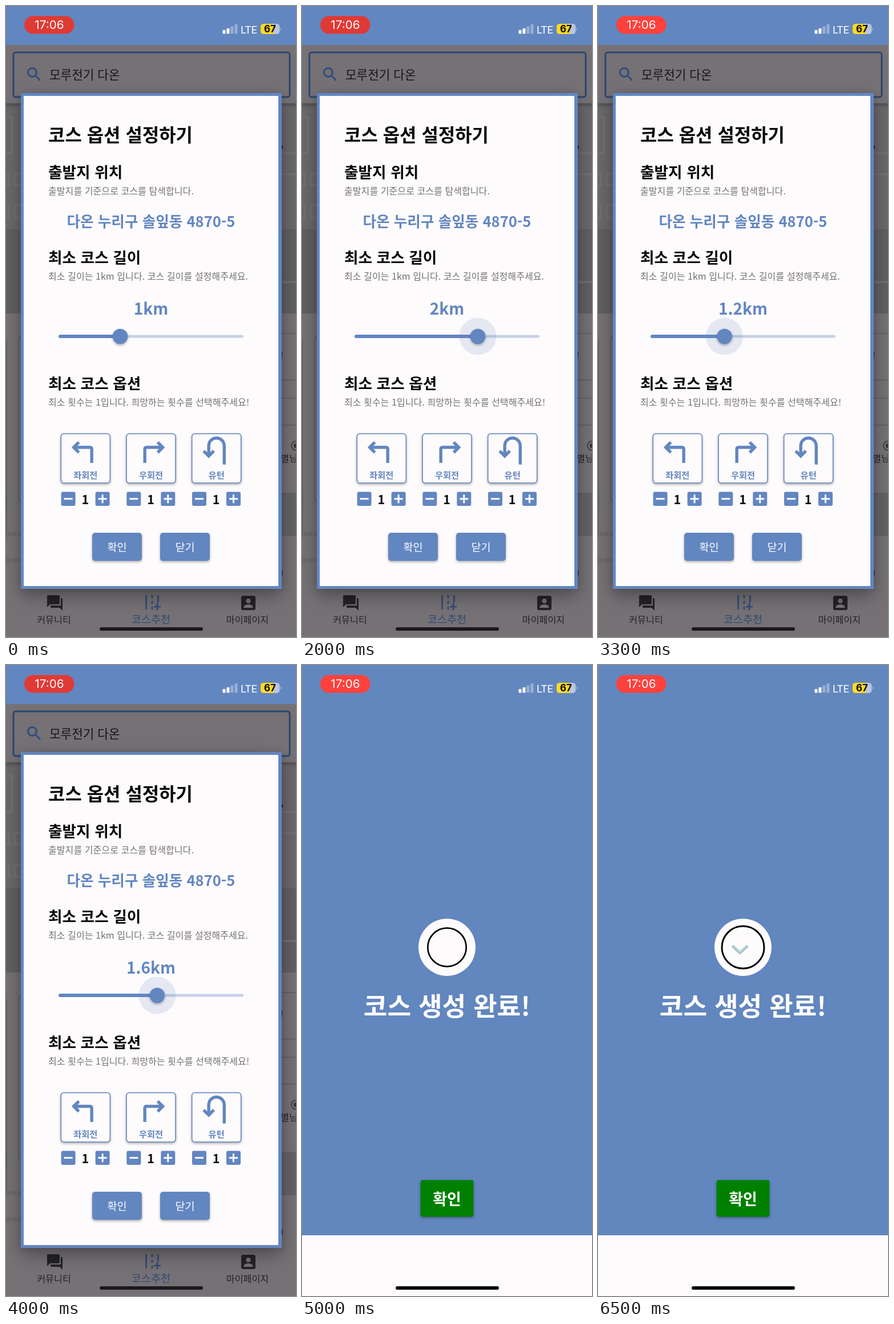
An HTML page that plays this animation: 508x1102 px, repeating every 6.6 s.

```html
<!DOCTYPE html>
<html lang="ko">
<head>
<meta charset="utf-8">
<title>코스 옵션</title>
<style>
html, body { margin: 0; width: 100%; height: 100%; overflow: hidden; background: #6286c0; }
svg { display: block; width: 100vw; height: 100vh; }
text { font-family: "Noto Sans CJK KR", "Noto Sans CJK", "Noto Sans", sans-serif; }
.ui { font-family: Inter, Roboto, sans-serif; }
.b { font-weight: 700; }
.m { font-weight: 500; }
.mid { text-anchor: middle; }
.blue { fill: #6286c0; }
.white { fill: #fff; }
.h2 { font-size: 26.7px; font-weight: 700; fill: #0b0a0b; }
.sub { font-size: 16.1px; fill: #747175; }
.lift { filter: drop-shadow(0 2.5px 2px rgba(0,0,0,.32)); }
.dialog { filter: drop-shadow(0 12px 16px rgba(0,0,0,.3)) drop-shadow(0 2px 6px rgba(0,0,0,.12)); }
</style>
</head>
<body>
<svg viewBox="0 0 508 1102" preserveAspectRatio="none">
  <g id="options">
    <rect width="508" height="1102" fill="#757175"/>
    <!-- dimmed map -->
    <rect y="165" width="508" height="372" fill="#6b686c"/>
    <rect y="390" width="508" height="147" fill="#625f63"/>
    <g fill="none" stroke="#726f73" stroke-width="4">
      <path d="M0 194H11V256H0M0 293H5V313H0M15 293H30V313H15ZM0 348H5V370H0M15 348H30V370H15Z"/>
      <path d="M480 257H508M480 294H508M480 482H508"/>
    </g>
    <rect y="537" width="508" height="460" fill="#757175"/>
    <g fill="none" stroke="#656266" stroke-width="2">
      <path d="M1 584V928M30 576Q22 576 22 586V858Q22 866 30 866M470 572H508M470 653H508M470 685H508M470 732H508"/>
      <path d="M0 922H30M0 968H30" stroke-width="7" stroke-dasharray="2 2"/>
    </g>
    <rect x="470" y="850" width="38" height="76" fill="#656266"/>
    <path d="M0 850V878" stroke="#3d6242" stroke-width="2"/>
    <g fill="#252326">
      <rect x="482" y="244" width="3" height="5"/>
      <path d="M482 603h2v9h-2zM482 614h2v2h-2z"/>
      <text x="481" y="796" font-size="16.3" class="m">별님</text>
      <text x="481" y="996" font-size="15">)</text>
    </g>
    <circle cx="508" cy="768" r="8" fill="none" stroke="#343135" stroke-width="1.5"/>
    <circle cx="508" cy="768" r="4" fill="#343135"/>
    <!-- search field -->
    <rect x="-4" y="60" width="516" height="110" rx="4" fill="#757175" style="filter:drop-shadow(0 3px 3px rgba(0,0,0,.3))"/>
    <rect x="13" y="81" width="484" height="78" rx="4" fill="none" stroke="#2c466f" stroke-width="3"/>
    <g fill="none" stroke="#304c7b" stroke-width="3"><circle cx="46" cy="116" r="7.5"/><path d="M51.5 121.5L60 130"/></g>
    <text x="76" y="128" font-size="21.3" fill="#171517">모루전기 다온</text>
    <rect width="508" height="68" class="blue"/>
    <!-- navigation -->
    <rect y="997" width="508" height="105" fill="#757175"/>
    <g fill="#242226">
      <path d="M73 1029H92Q94 1029 94 1031V1043Q94 1045 92 1045H77L72 1050V1031Q72 1029 73 1029Z"/>
      <path d="M96 1034H98Q99 1034 99 1036V1056L94 1051H80Q78 1051 78 1049V1047H96Z"/>
      <rect x="412" y="1030" width="25" height="25" rx="3"/>
      <g fill="#757175"><circle cx="424.5" cy="1039" r="4"/><path d="M416 1051Q417 1045 424.5 1045T433 1051Z"/></g>
      <g class="mid m" font-size="16.2"><text x="84" y="1077.5">커뮤니티</text><text x="423" y="1077.5">마이페이지</text></g>
    </g>
    <path d="M245.5 1029V1054M266.5 1029V1042M256 1029V1034M256 1039V1044M256 1049V1054M259 1049H271M265 1043V1055" fill="none" stroke="#304a75" stroke-width="2.7"/>
    <text x="254" y="1077.5" class="mid m" font-size="18.6" fill="#304a75">코스추천</text>
    <rect x="164" y="1085" width="181" height="6" rx="3" fill="#1b191b"/>
    <!-- dialog -->
    <g class="dialog"><rect x="26" y="152" width="457" height="866" class="blue"/></g>
    <rect x="31" y="157" width="446" height="856" fill="#fefbfd"/>
    <text x="74" y="236.5" font-size="31.95" class="b" fill="#0b0a0b">코스 옵션 설정하기</text>
    <text x="74" y="300" class="h2">출발지 위치</text>
    <text x="74" y="328.5" class="sub">출발지를 기준으로 코스를 탐색합니다.</text>
    <text x="254" y="385.5" font-size="25.6" class="b blue mid">다온 누리구 솔잎동 4870-5</text>
    <text x="74" y="449" class="h2">최소 코스 길이</text>
    <text x="74" y="477.5" class="sub">최소 길이는 1km 입니다. 코스 길이를 설정해주세요.</text>
    <text id="distance" x="254" y="538.5" font-size="28" class="b blue mid"></text>
    <rect x="92" y="574.5" width="324" height="5" rx="2.5" fill="#c5d1e7"/>
    <rect id="filled" x="92" y="574" height="6" rx="3" class="blue"/>
    <g id="thumb">
      <circle id="halo" r="32.5" class="blue" fill-opacity=".16"/>
      <circle r="13.3" class="blue lift"/>
    </g>
    <text x="74" y="669" class="h2">최소 코스 옵션</text>
    <text x="74" y="697.5" class="sub">최소 횟수는 1입니다. 희망하는 횟수를 선택해주세요!</text>
    <g id="turns"></g>
    <g id="actions"></g>
  </g>

  <g id="complete">
    <rect width="508" height="1102" fill="#6286be"/>
    <rect y="996" width="508" height="106" fill="#fefbfd"/>
    <circle cx="254" cy="493" r="50" fill="#fefbfd"/>
    <g id="badge" fill="none">
      <circle r="37" stroke="#050505" stroke-width="3"/>
      <g id="check" stroke-linecap="round">
        <path d="M-17 -1.5L-5.5 9.5L6.5 -1.5" pathLength="100" stroke="#93adb8" stroke-width="4.5"/>
        <path d="M-17 -2.5L-5.5 8.5L6.5 -2.5" pathLength="100" stroke="#b8dad9" stroke-width="3"/>
      </g>
    </g>
    <text x="254" y="612.5" font-size="45.3" class="b white mid">코스 생성 완료!</text>
    <rect x="207.5" y="899.5" width="93" height="64" rx="4" fill="#008000" class="lift"/>
    <text x="254" y="942.5" font-size="26.9" class="b white mid">확인</text>
    <rect x="164" y="1085" width="181" height="6" rx="3" fill="#050505"/>
  </g>

  <g id="status">
    <rect id="record" x="32" y="17.5" width="87.5" height="31" rx="15.5"/>
    <text x="76" y="40.3" font-size="20.7" class="ui mid white">17:06</text>
    <g class="white">
      <rect x="379.5" y="42" width="5" height="6.5" rx="1"/>
      <rect x="386.5" y="39" width="5" height="9.5" rx="1"/>
      <g opacity=".35"><rect x="393.5" y="35.5" width="5" height="13" rx="1"/><rect x="400.5" y="32" width="5" height="16.5" rx="1"/></g>
      <text x="425.5" y="47.5" font-size="18.5" class="mid" style="font-family:Roboto,sans-serif">LTE</text>
    </g>
    <clipPath id="cell"><rect x="446" y="31" width="33.5" height="18" rx="5.5"/></clipPath>
    <g clip-path="url(#cell)"><rect x="446" y="31" width="34" height="18" fill="#b9c6de"/><rect x="446" y="31" width="23" height="18" fill="#fad91f"/></g>
    <path d="M481 37.5Q483 40 481 43Z" fill="#b9c6de"/>
    <text x="462.5" y="46.3" font-size="17" class="ui b mid" fill="#080808">67</text>
  </g>
</svg>
<script>
const $ = id => document.getElementById(id);
const clamp = x => Math.max(0, Math.min(1, x));

// Icons on a 24-unit grid
const turnPath = 'M6.83 11l1.58 1.59L7 14l-4-4 4-4 1.41 1.41L6.83 9H15c1.1 0 2 .9 2 2v9h-2v-9z';
const uTurnPath = 'M18 9v12h-2V9c0-2.21-1.79-4-4-4S8 6.79 8 9v4.17l1.59-1.59L11 13l-4 4-4-4 1.41-1.41L6 13.17V9c0-3.31 2.69-6 6-6s6 2.69 6 6z';
const turns = [
  { x: 139.3, label: '좌회전', path: turnPath },
  { x: 254, label: '우회전', path: turnPath, flip: true },
  { x: 368.7, label: '유턴', path: uTurnPath }
];

const stepButton = (x, sign) => `
  <rect x="${x - 12.5}" y="848.5" width="25" height="24.5" rx="3" class="blue"/>
  <path d="M${x - 7.5} 860.7h15${sign === '+' ? `M${x} 853.2v15` : ''}" stroke="#fff" stroke-width="3"/>`;

$('turns').innerHTML = turns.map(({ x, label, path, flip }) => `
  <g transform="translate(${x} 0)">
    <rect x="-43" y="747" width="86" height="86" rx="5" fill="#fefbfd" stroke="#6286c0" stroke-width="1.6" class="lift"/>
    <path d="${path}" class="blue" transform="translate(0 743.7) scale(${flip ? -2.713 : 2.713} 2.713) translate(-12 0)"/>
    <text y="825" font-size="15.3" class="b blue mid">${label}</text>
    ${stepButton(-30.2, '-')}${stepButton(29.8, '+')}
    <text x="-.5" y="869.5" font-size="21.5" class="b mid" fill="#0b0a0b">1</text>
  </g>`).join('');

$('actions').innerHTML = [[194.5, '확인'], [313.5, '닫기']].map(([x, label]) => `
  <rect x="${x - 43.5}" y="920" width="87" height="49" rx="5" class="blue lift"/>
  <text x="${x}" y="952" font-size="18.6" class="m white mid">${label}</text>`).join('');

const LOOP = 6600, COMPLETE_AT = 5000;
// Turning points of the drag: [ms, km]
const drag = [[450, 1], [1700, 2], [2200, 2], [3300, 1.2], [3500, 1.2], [4500, 2]];

function distanceAt(t) {
  let km = drag[0][1];
  for (let i = 1; i < drag.length; i++) {
    const [from, a] = drag[i - 1], [to, b] = drag[i];
    const u = clamp((t - from) / (to - from));
    if (u > 0) km = a + (b - a) * (1 - Math.cos(u * Math.PI)) / 2;
  }
  return Math.round(km * 5) / 5;
}

function render(time) {
  const t = Math.floor(time % LOOP / 100) * 100;
  const done = t >= COMPLETE_AT;
  $('options').style.display = done ? 'none' : '';
  $('complete').style.display = done ? '' : 'none';

  const glow = clamp(.5 + 1.6 * Math.cos((t - 900) / 1000 * Math.PI));
  $('record').setAttribute('fill', `rgb(${224 + 30 * glow},${58 + 7 * glow},${53 + 7 * glow})`);

  const km = distanceAt(t);
  const x = 92 + km * 108;
  $('distance').textContent = km + 'km';
  $('filled').setAttribute('width', x - 92);
  $('thumb').setAttribute('transform', `translate(${x} 577)`);
  const press = clamp((t - 400) / 200) * clamp((4800 - t) / 200);
  $('halo').setAttribute('r', 32.5 * press);

  const scale = 1 - .09 * clamp((6500 - t) / 1000);
  $('badge').setAttribute('transform', `translate(254 493) scale(${scale})`);
  const drawn = clamp((t - 5300) / 400);
  $('check').setAttribute('stroke-dasharray', `${drawn * 100} 200`);
  $('check').style.display = drawn ? '' : 'none';
}

const start = performance.now();
function tick() {
  render(performance.now() - start);
  requestAnimationFrame(tick);
}
tick();
</script>
</body>
</html>
```
